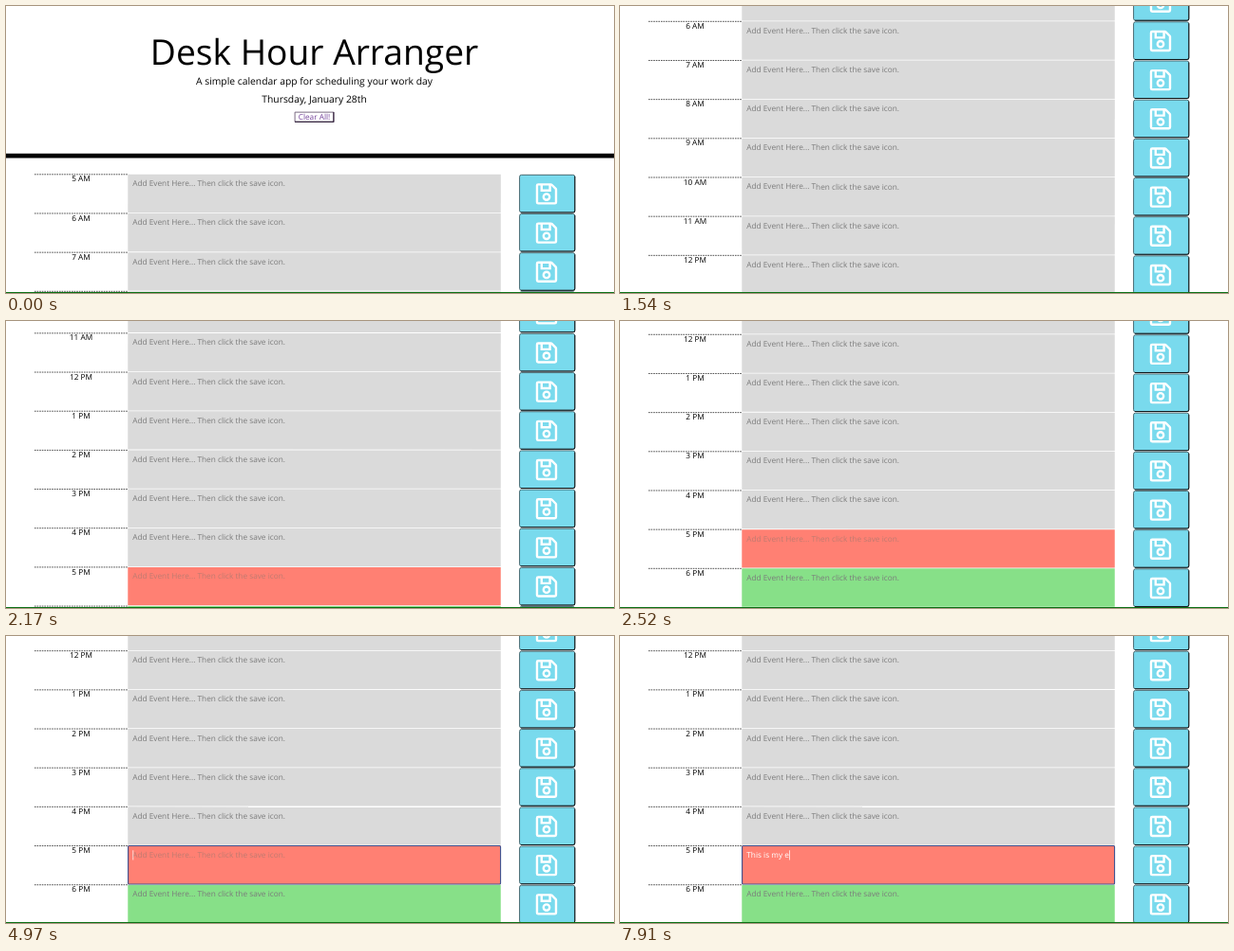
An HTML page that plays this animation: 640 by 303 pixels, repeating every 8000 ms.

```html
<!DOCTYPE html>
<html lang="en">
<head>
<meta charset="utf-8">
<title>Desk Hour Arranger</title>
<style>
  html, body { margin: 0; width: 100%; height: 100%; overflow: hidden; background: #fff; }
  svg { display: block; width: 640px; height: 303px; }
  text { font: 8.264px "Open Sans", "Noto Sans", sans-serif; white-space: pre; text-rendering: geometricPrecision; }
  .mid { text-anchor: middle; }
  .title { font-size: 37.19px; }
  .lead { font-size: 10.33px; }
  .hint { fill: #7b7b7b; }
  .present .hint { fill: #bf7a70; }
  .past .slot { fill: #dadada; }
  .present .slot { fill: #ff8073; }
  .future .slot { fill: #87e088; }
</style>
</head>
<body>
<svg viewBox="0 0 640 303">
  <defs>
    <g id="save" fill="none" stroke="#fff" stroke-width="48">
      <path d="M48 56H316Q326 56 333 63L417 147Q424 154 424 164V432Q424 456 400 456H48Q24 456 24 432V80Q24 56 48 56Z"/>
      <path d="M120 56V184H296V56"/>
      <circle cx="224" cy="320" r="64"/>
    </g>
  </defs>
  <g id="page">
    <text class="mid title" x="324.5" y="62.3">Desk Hour Arranger</text>
    <text class="mid lead" x="324.5" y="83">A simple calendar app for scheduling your work day</text>
    <text class="mid lead" x="324.5" y="101.7">Thursday, January 28th</text>
    <g fill="none">
      <rect x="304.1" y="112.1" width="40.8" height="10.2" stroke="#6b5a74" stroke-width=".9"/>
      <path d="M304 122.3H344.9V112" stroke="#21102b"/>
    </g>
    <text class="mid" x="324.5" y="120.3" fill="#74429a">Clear All!</text>
    <rect y="155.7" width="640" height="4.8"/>
    <g id="rows"></g>
    <g id="focus">
      <rect x="128.6" width="392" height="40.4" rx="1" fill="none" stroke="#40518f" stroke-width="1.1"/>
      <text id="typed" x="133.3" y="12.5" fill="#fff"></text>
      <rect id="caret" y="4.6" width=".7" height="10.4" fill="#fff"/>
    </g>
  </g>
  <rect y="302" width="640" height="1" fill="#0b7014"/>
</svg>
<script>
const LOOP = 8000, ROW_TOP = 177.8, ROW_PITCH = 41.17, CURRENT = 12;
const FOCUS_AT = 3000, BLINK = 490;
const MESSAGE = "This is my e";
const KEY_TIMES = [5250, 5390, 5460, 5600, 5740, 5880, 5950, 6160, 6370, 6580, 7000, 7560];
const SCROLL = [
  [1050, 0], [1260, .7], [1330, 25], [1400, 80], [1470, 145], [1540, 202], [1610, 248],
  [1680, 285], [1820, 340], [1960, 378], [2170, 411.8], [2310, 432], [2430, 447],
  [2520, 451.7], [2700, 451.7], [2830, 450.3]
];
const $ = id => document.getElementById(id);

const rowTop = i => ROW_TOP + i * ROW_PITCH;

function rowMarkup(i) {
  const hour = i + 5;
  const label = `${hour > 12 ? hour - 12 : hour} ${hour < 12 ? "AM" : "PM"}`;
  const state = i < CURRENT ? "past" : i === CURRENT ? "present" : "future";
  return `<g class="${state}" transform="translate(0 ${rowTop(i)})">
    <path d="M30 0H128.3" stroke="#222" stroke-width=".8" stroke-dasharray="1.6 1"/>
    <text class="mid" x="79" y="7.6">${label}</text>
    <rect class="slot" x="128.3" y="0" width="392.5" height="40.4"/>
    <text class="hint" x="133.3" y="12.5">Add Event Here... Then click the save icon.</text>
    <rect x="540.6" y=".5" width="58.2" height="39.6" rx="2" fill="#79daed" stroke="#3f5d64" stroke-width=".9"/>
    <path d="M542 40.1H596.8Q598.8 40.1 598.8 38.1V2" fill="none" stroke="#10191c"/>
    <use href="#save" transform="translate(557.8 7.8) scale(.05)"/>
  </g>`;
}

function scrollAt(t) {
  const next = SCROLL.findIndex(([time]) => time > t);
  if (next === 0) return 0;
  if (next < 0) return SCROLL[SCROLL.length - 1][1];
  const [t0, y0] = SCROLL[next - 1], [t1, y1] = SCROLL[next];
  return y0 + (y1 - y0) * (t - t0) / (t1 - t0);
}

$("rows").innerHTML = Array.from({ length: 15 }, (_, i) => rowMarkup(i)).join("");
$("focus").setAttribute("transform", `translate(0 ${rowTop(CURRENT)})`);
const currentHint = document.querySelector(".present .hint");

function draw(t) {
  // The hair of rotation keeps text baselines from snapping to whole pixels.
  $("page").setAttribute("transform", `translate(0 ${-scrollAt(t)}) rotate(.002)`);

  const count = KEY_TIMES.filter(time => time <= t).length;
  const lastInput = count ? KEY_TIMES[count - 1] : FOCUS_AT;
  const caretOn = Math.floor((t - lastInput) / BLINK) % 2 === 0;
  $("focus").style.display = t < FOCUS_AT ? "none" : "";
  $("typed").textContent = MESSAGE.slice(0, count);
  currentHint.style.display = count ? "none" : "";
  $("caret").style.display = caretOn ? "" : "none";
  $("caret").setAttribute("x", 133.5 + (count ? $("typed").getComputedTextLength() : 0));
}

function tick() {
  draw(performance.now() % LOOP);
  requestAnimationFrame(tick);
}
tick();
</script>
</body>
</html>
```
